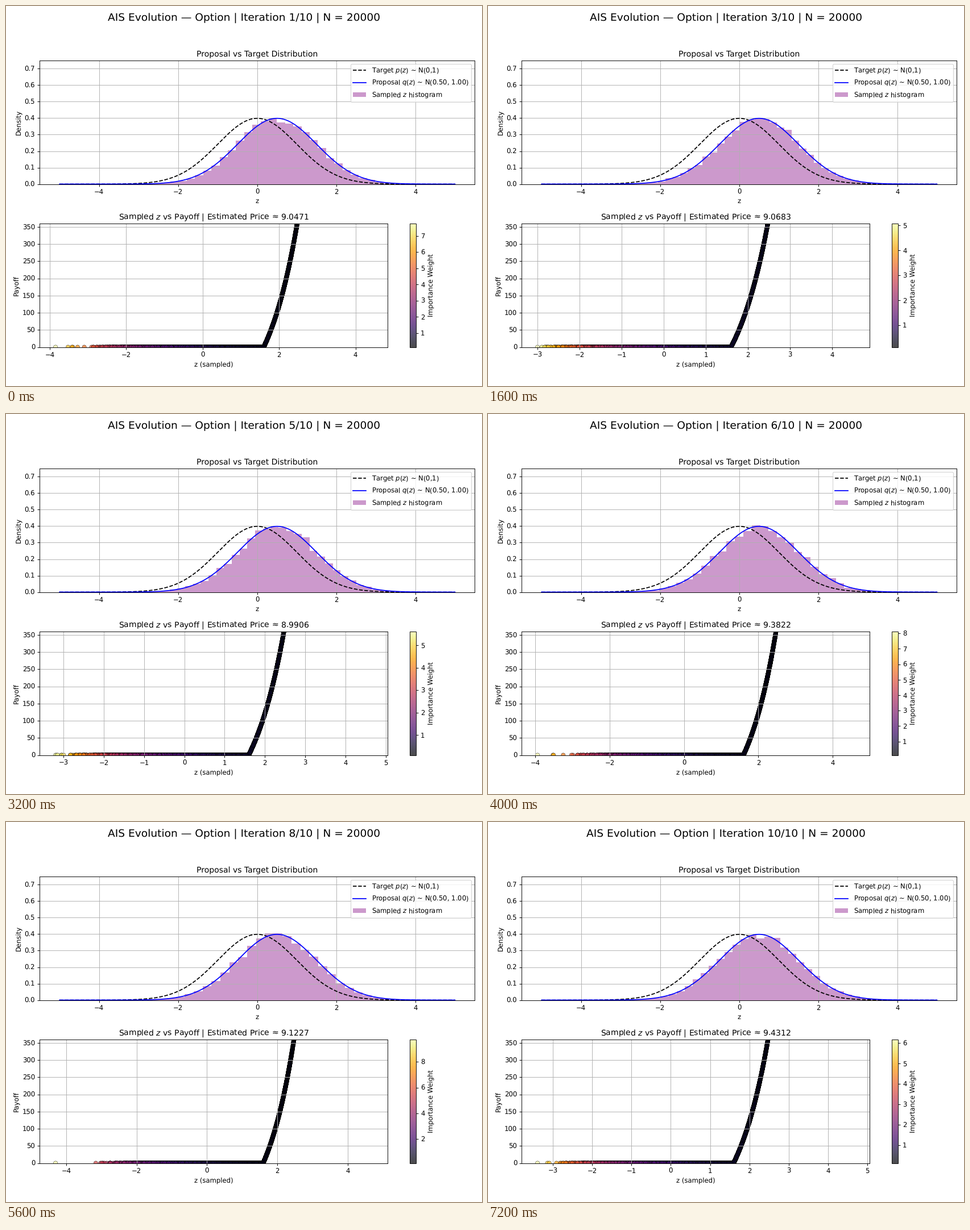
A matplotlib script that plays this animation: 837x669 px, repeating every 8000 ms.

```python
import numpy as np
import matplotlib.pyplot as plt
from matplotlib.animation import FuncAnimation

W, H, DPI = 837, 669, 83.7
N, BINS, MU = 20000, 40, 0.5
STRIKE, VOL, Z_HIT = 200, 1.175, 1.597

# One value per iteration: estimated price and the sampled range of z.
PRICE = [9.0471, 9.1538, 9.0683, 9.2489, 8.9906, 9.3822, 9.2146, 9.1227, 9.0894, 9.4312]
LOW = [-3.85, -3.45, -3.0, -3.38, -3.2, -3.94, -3.81, -4.305, -3.7, -3.39]
HIGH = [4.43, 4.5, 4.52, 4.31, 4.66, 4.57, 4.6, 4.69, 4.5, 4.66]
STEPS = len(PRICE)


def normal_pdf(x, mu=0.0):
    return np.exp(-(x - mu) ** 2 / 2) / np.sqrt(2 * np.pi)


def payoff(z):
    return STRIKE * np.maximum(np.exp(VOL * (z - Z_HIT)) - 1, 0)


def weight(z):
    return np.exp(MU ** 2 / 2 - MU * z)


def sample(i):
    """Normal draws that fill the iteration's range exactly."""
    z = np.random.default_rng(i).normal(MU, 1, N)
    z = z[(z > LOW[i]) & (z < HIGH[i])]
    return np.concatenate([[LOW[i]], z, [HIGH[i]]])


def add_axes(left, top, width, height=217.8):
    return fig.add_axes([left / W, 1 - (top + height) / H, width / W, height / H])


plt.rcParams["text.hinting"] = "no_hinting"
fig = plt.figure(figsize=((W + 1e-3) / DPI, (H + 1e-3) / DPI), dpi=DPI)
heading = fig.suptitle("", fontsize=16)

dist = add_axes(59.3, 95.8, 765)
x = np.linspace(-5, 5, 500)
dist.plot(x, normal_pdf(x), "k--", label="Target $p(z)$ ~ N(0,1)")
dist.plot(x, normal_pdf(x, MU), "b-", label="Proposal $q(z)$ ~ N(0.50, 1.00)")
bars = dist.bar(np.zeros(BINS), np.zeros(BINS), align="edge", color="purple",
                alpha=0.4, label="Sampled $z$ histogram")
dist.set(xlim=(-5.5, 5.5), ylim=(0, 0.75), xlabel="z", ylabel="Density",
         title="Proposal vs Target Distribution")
dist.grid(True)
dist.legend(loc="upper right")

pay = add_axes(59.3, 382.8, 612)
z0 = sample(0)
dots = pay.scatter(z0, payoff(z0), c=weight(z0), cmap="inferno", s=40,
                   alpha=0.7, edgecolors="k", linewidths=0.5)
pay.set(ylim=(0, 360), xlabel="z (sampled)", ylabel="Payoff")
pay.grid(True)
fig.colorbar(dots, cax=add_axes(709.9, 382.8, 10.9), label="Importance Weight")


def draw(i):
    z = sample(i)
    heights, edges = np.histogram(z, BINS, density=True)
    for bar, h, e in zip(bars, heights, edges):
        bar.set(x=e, width=edges[1] - edges[0], height=h)

    w = weight(z)
    dots.set_offsets(np.column_stack([z, payoff(z)]))
    dots.set_array(w)
    dots.set_clim(w.min(), w.max())
    pad = 0.05 * (HIGH[i] - LOW[i])
    pay.set_xlim(LOW[i] - pad, HIGH[i] + pad)
    pay.set_title(f"Sampled $z$ vs Payoff | Estimated Price ≈ {PRICE[i]:.4f}")
    heading.set_text(f"AIS Evolution — Option | Iteration {i + 1}/{STEPS} | N = {N}")
    return [heading, dots, *bars]


anim = FuncAnimation(fig, draw, frames=STEPS, init_func=lambda: draw(0),
                     interval=800, repeat=True, repeat_delay=0, blit=False)
plt.show()
```
